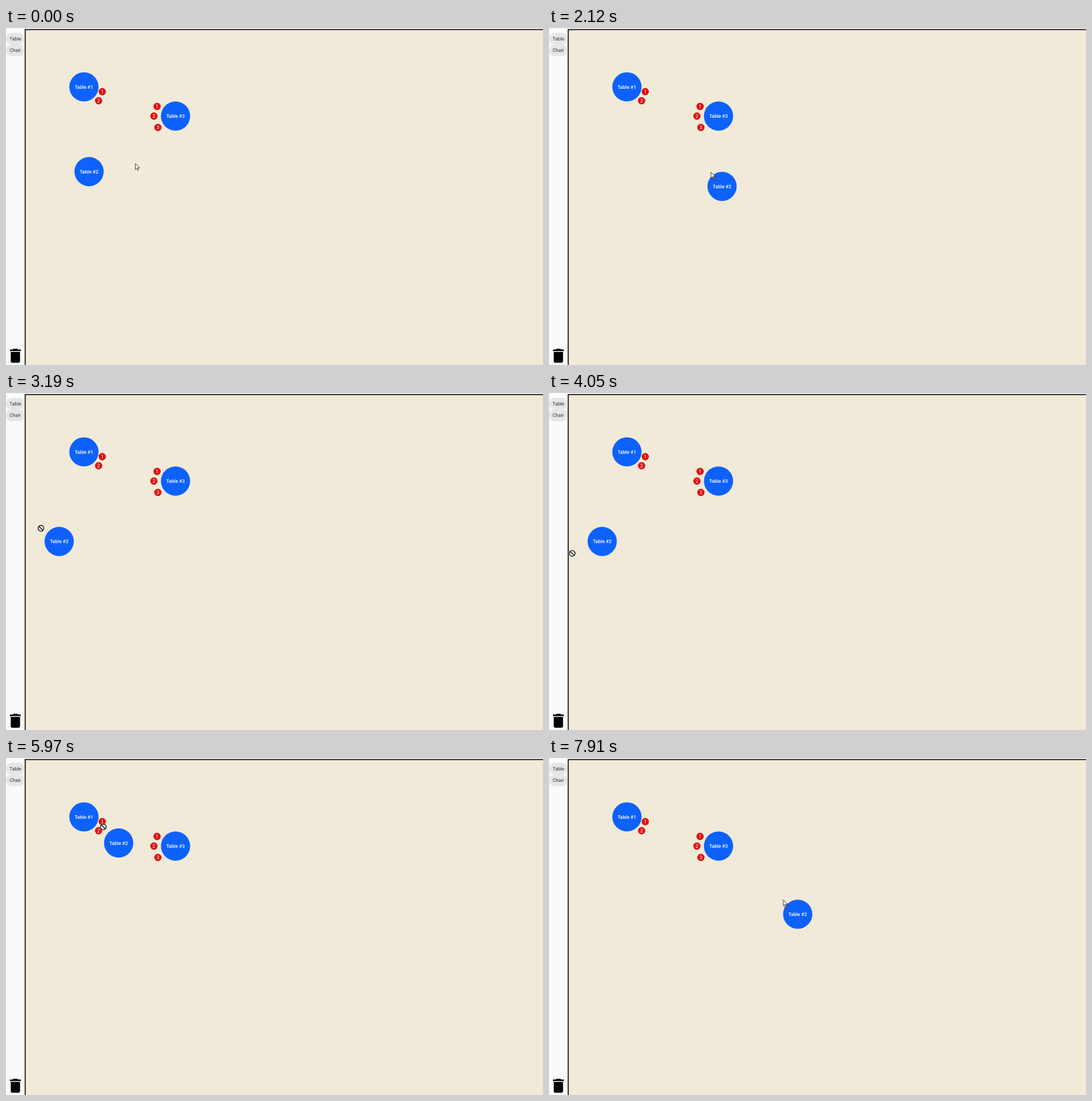
An HTML page that plays this animation: 944x593 px, repeating every 7.99 s.

```html
<!DOCTYPE html>
<html lang="en">
<head>
<meta charset="utf-8">
<title>Seating plan</title>
<style>
  html, body { margin: 0; width: 100%; height: 100%; overflow: hidden; background: #fafafa; }
  svg { display: block; width: 944px; height: 593px; }
  text { font: 8.5px Roboto, sans-serif; text-anchor: middle; text-rendering: geometricPrecision; }
  .chip rect { fill: #e6e6e6; }
  .chip text { fill: #333; }
  .table circle { fill: #0d62ff; }
  .table text { fill: #fff; font-weight: 500; }
  .chair circle { fill: #e01010; }
  .chair text { fill: #fff; font-size: 9px; }
</style>
</head>
<body>
<svg viewBox="0 0 944 593">
  <rect width="944" height="593" fill="#fafafa"/>
  <rect x="33.75" y="2.75" width="920" height="600" fill="#f1ead8" stroke="#111" stroke-width="1.8"/>
  <g class="chip"><rect y="8.5" width="32.6" height="20.6" rx="10.3"/><text x="16.6" y="21.8">Table</text></g>
  <g class="chip"><rect y="29.1" width="32.6" height="20.6" rx="10.3"/><text x="16.2" y="42.4">Chair</text></g>
  <path transform="translate(.2 560.4) scale(1.36)"
    d="M6 19c0 1.1.9 2 2 2h8c1.1 0 2-.9 2-2V7H6v12zM19 4h-3.5l-1-1h-5l-1 1H5v2h14V4z"/>
  <g id="plan"></g>
  <g id="cursor">
    <g id="arrow">
      <path d="M.5 .5V11L3 8.7 4.6 12.5 6.2 11.8 4.6 8.1H8Z" fill="#fff" stroke="#111" stroke-width=".8"/>
      <rect id="badge" x="2.5" y="9.5" width="7" height="6.5" fill="none" stroke="#55502c" stroke-width=".9" stroke-dasharray="1.2 .7"/>
    </g>
    <g id="blocked" fill="none">
      <g stroke="#fff" stroke-width="2.4"><circle r="5.1"/><path d="M-3.6-3.6 3.6 3.6"/></g>
      <g stroke="#000" stroke-width="1.4"><circle r="5.1"/><path d="M-3.6-3.6 3.6 3.6"/></g>
    </g>
  </g>
</svg>
<script>
const LOOP = 7990, LAG = 22, GRAB = 1200, R = 25.7, CHAIR_R = 6.4;
const EDGE = 67.5, CHAIR_REACH = 9.4;
const $ = id => document.getElementById(id);

// turning points of the pointer: time, x, y
const turns = [
  [470, 227, 238], [1010, 147, 248], [GRAB, 147, 248],
  [1650, 237, 256], [1850, 225, 252], [2120, 284, 253],
  [2400, 366, 240], [2560, 350, 213], [3190, 61.5, 238],
  [3900, 36, 302], [4300, 60, 216], [4800, 123.5, 104],
  [5000, 138, 90.5], [5500, 187, 112], [5800, 176, 128],
  [6160, 168, 113], [6760, 199, 152], [6820, 203, 182.5],
  [7640, 411.5, 249.2]
];
const last = turns.length - 1;

// monotone cubic through the turning points
const slope = (i, k) => (turns[i + 1][k] - turns[i][k]) / (turns[i + 1][0] - turns[i][0]);
function tangent(i, k) {
  if (i === 0 || i === last) return 0;
  const a = slope(i - 1, k), b = slope(i, k);
  return a * b > 0 ? 2 * a * b / (a + b) : 0;
}
function pointer(time) {
  const t = Math.min(Math.max(time, turns[0][0]), turns[last][0]);
  const next = turns.findIndex(p => p[0] > t);
  const i = next < 0 ? last - 1 : next - 1;
  const from = turns[i], to = turns[i + 1];
  const h = to[0] - from[0], u = (t - from[0]) / h, v = 1 - u;
  return [1, 2].map(k =>
    from[k] * (1 + 2 * u) * v * v + to[k] * u * u * (3 - 2 * u) +
    h * u * v * (tangent(i, k) * v - tangent(i + 1, k) * u));
}

function disc(kind, x, y, r, label) {
  $("plan").insertAdjacentHTML("beforeend",
    `<g class="${kind}" transform="translate(${x} ${y})"><circle r="${r}"/><text y="3.1">${label}</text></g>`);
  return $("plan").lastElementChild;
}
const home = [137, 103.6];
const chairs = [[169.2, 112, 1], [162.8, 128, 2], [265.6, 138, 1], [260, 155, 2], [267, 175, 3]];
disc("table", ...home, R, "Table #1");
disc("table", 298, 155, R, "Table #3");
const moving = disc("table", 146, 252.7, R, "Table #2");
chairs.forEach(([x, y, n]) => disc("chair", x, y, CHAIR_R, n));

// a drop is refused near the left edge and on top of Table #1 or its chairs
function refused(t) {
  if (t < GRAB) return false;
  const [x, y] = pointer(t);
  return x < EDGE || Math.hypot(x - home[0], y - home[1]) < R ||
    chairs.slice(0, 2).some(([cx, cy]) => Math.max(Math.abs(x - cx), Math.abs(y - cy)) < CHAIR_REACH);
}
// the table waits at the last place where a drop was allowed
function tableCorner(t) {
  if (t < GRAB) return [120.3, 227];
  while (refused(t)) t -= 4;
  return pointer(t);
}

const place = (el, x, y) => el.setAttribute("transform", `translate(${x.toFixed(2)} ${y.toFixed(2)})`);
const show = (el, on) => el.setAttribute("visibility", on ? "visible" : "hidden");

function draw(t) {
  const stop = refused(t);
  place($("cursor"), ...pointer(t));
  show($("arrow"), !stop);
  show($("badge"), !stop && t >= GRAB);
  show($("blocked"), stop);
  const [x, y] = tableCorner(t - LAG);
  place(moving, x + R, y + R);
}
const start = performance.now();
function tick() {
  draw((performance.now() - start) % LOOP);
  requestAnimationFrame(tick);
}
tick();
</script>
</body>
</html>
```
